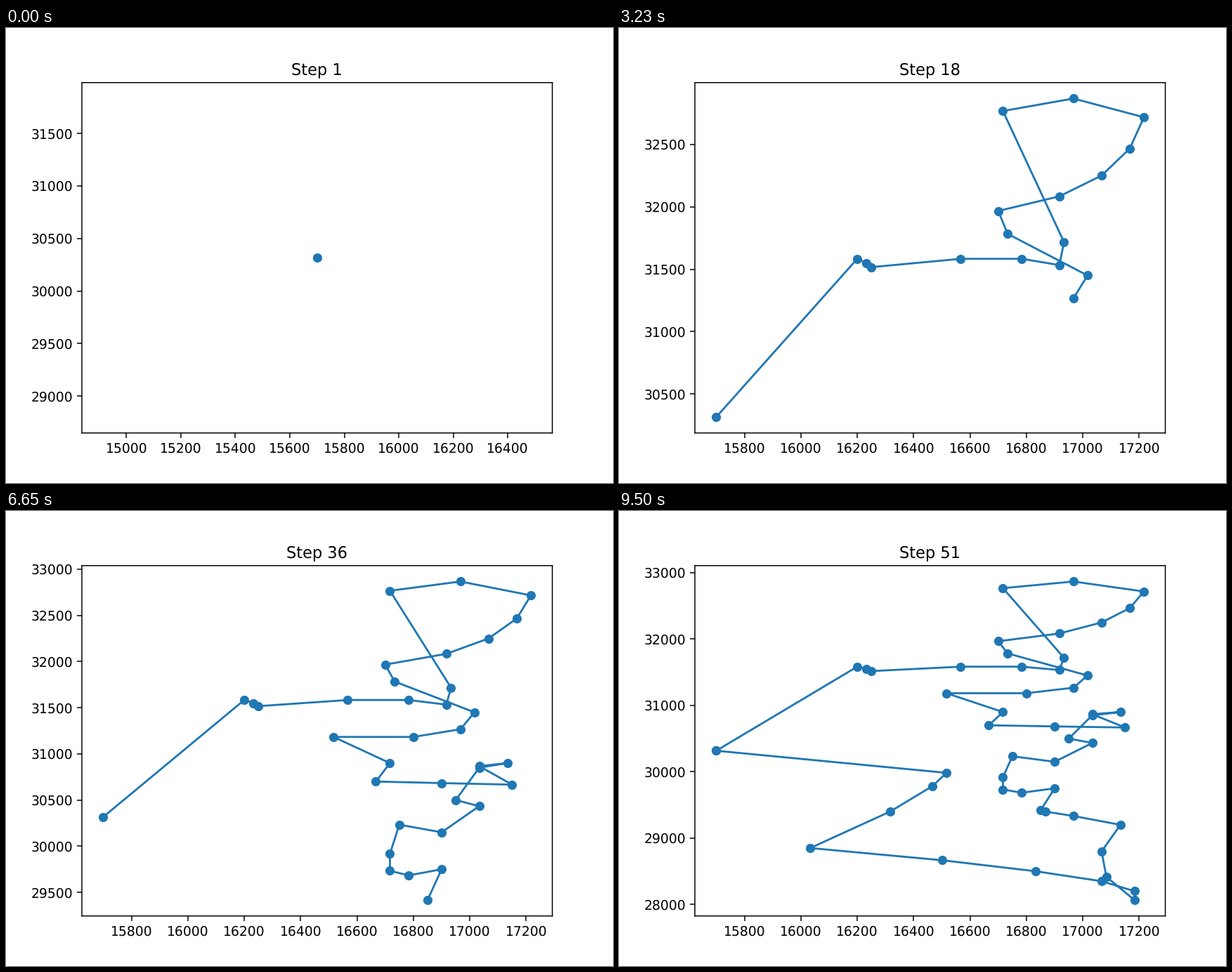
Animation, 864 px wide and 648 px high, one loop 9690 ms. Source, as a matplotlib script:

```python
import matplotlib.pyplot as plt
import numpy as np
from matplotlib.animation import FuncAnimation

# Soft, unsnapped edges and unhinted glyphs
plt.rcParams.update({"path.snap": False, "text.hinting": "none"})

START = (942, 1819)

# Legs in arc minutes: end point, number of stops, bend of the arc
LEGS = [
    ((972, 1895),),
    ((975, 1891), 2),
    ((1015, 1892), 3, (1007, 1900)),
    ((1016, 1903),),
    ((1003, 1966),),
    ((1018, 1972),),
    ((1033, 1963),),
    ((1002, 1918), 4, (1031, 1930)),
    ((1004, 1907),),
    ((1021, 1887),),
    ((991, 1871), 3, (1021, 1867)),
    ((1003, 1854),),
    ((1000, 1842),),
    ((1029, 1840), 2),
    ((1022, 1852),),
    ((1028, 1854),),
    ((1022, 1851),),
    ((1017, 1830),),
    ((1022, 1826),),
    ((1014, 1809),),
    ((1005, 1814),),
    ((1014, 1785), 4, (997, 1769)),
    ((1011, 1765),),
    ((1028, 1752), 3, (1010, 1766)),
    ((1031, 1684), 3, (1018, 1714)),
    ((962, 1731), 5, (1040, 1703)),
    ((991, 1799), 3, (992, 1788)),
    (START,),
]


def arc(a, b, stops=1, bend=None):
    """Evenly timed stops on a quadratic curve, straight without a bend."""
    a, b = np.array(a), np.array(b)
    c = (a + b) / 2 if bend is None else np.array(bend)
    t = np.arange(1, stops + 1)[:, None] / stops
    return (1 - t) ** 2 * a + 2 * t * (1 - t) * c + t ** 2 * b


def build_tour():
    """All stops on whole minutes, in thousandths of a degree."""
    parts, here = [np.array([START])], START
    for leg in LEGS:
        parts.append(arc(here, *leg))
        here = leg[0]
    return np.round(np.vstack(parts)) * 1000 / 60


tour = build_tour()
fig, ax = plt.subplots(figsize=(6.4, 4.8), dpi=135)


def draw(i):
    x, y = tour[:i + 1].T
    ax.clear()
    ax.plot(x, y, color="C0")
    ax.scatter(x, y, s=36, color="C0", linewidths=1, zorder=2)
    ax.set_title(f"Step {i + 1}")


anim = FuncAnimation(fig, draw, frames=len(tour), interval=190,
                     init_func=lambda: None, repeat=True, repeat_delay=0)
plt.show()
```
